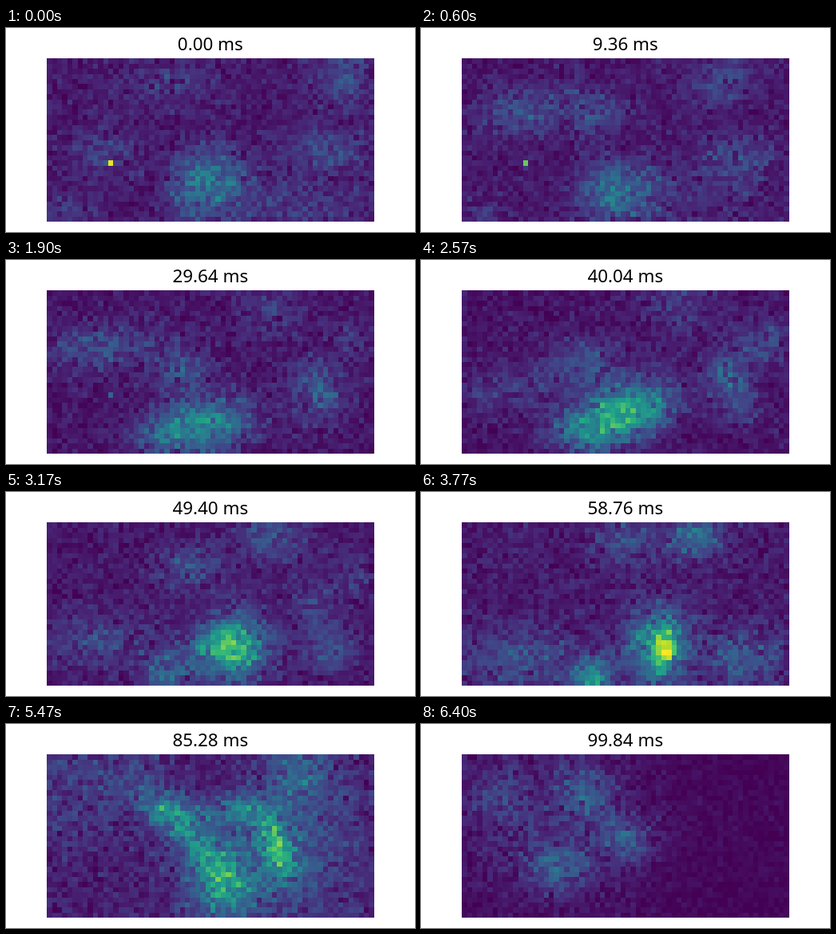
An HTML page with a canvas that plays this animation: 512 by 256 pixels, repeating every 6430 ms.

```html
<!DOCTYPE html>
<html lang="en">
<head>
<meta charset="utf-8">
<title>Intensity map</title>
<style>
  html, body { margin: 0; width: 100%; height: 100%; overflow: hidden; background: #fff; }
  canvas, svg { position: absolute; left: 0; top: 0; display: block; }
  text { font: 22.4px "Noto Sans", "Open Sans", sans-serif; fill: #000; text-anchor: middle; }
</style>
</head>
<body>
<canvas id="map" width="512" height="256"></canvas>
<svg width="512" height="256"><text id="label" x="255.8" y="27.5">0.00 ms</text></svg>
<script>
const COLS = 64, ROWS = 32, CELL = 6.4, LEFT = 51.2, TOP = 38.4;
const LOOP = 6430, STEP_MS = 0.52, LAST = 192;
const ctx = document.getElementById('map').getContext('2d');
const label = document.getElementById('label');

// Viridis, sampled every tenth
const STOPS = ['440154', '482475', '414487', '355f8d', '2a788e', '21918c',
  '22a884', '44bf70', '7ad151', 'bddf26', 'fde725']
  .map(h => [0, 2, 4].map(i => parseInt(h.slice(i, i + 2), 16)));
const PALETTE = Array.from({ length: 256 }, (_, n) => {
  const p = n / 25.5, i = Math.min(9, Math.floor(p));
  return `rgb(${STOPS[i].map((c, k) => Math.round(c + (STOPS[i + 1][k] - c) * (p - i)))})`;
});

const clamp = (v, lo, hi) => Math.min(hi, Math.max(lo, v));
const mix = (a, b, u) => a + (b - a) * u;

function rand(a, b = 0) {
  let h = Math.imul(a + 1, 0x9e3779b1) ^ Math.imul(b + 7, 0x85ebca6b);
  h = Math.imul(h ^ (h >>> 15), 0x2c1b3c6d);
  h = Math.imul(h ^ (h >>> 12), 0x297a2d39);
  return ((h ^ (h >>> 15)) >>> 0) / 4294967296;
}

// Roughly normal, unit deviation
const noise = (a, b) =>
  (rand(a, b * 3) + rand(a, b * 3 + 1) + rand(a, b * 3 + 2) - 1.5) * 2;

// Centre and radii in cells, peak brightness, tilt in radians
const blob = (x, y, rx, ry, amp, tilt = 0) => ({ x, y, rx, ry, amp, tilt });
const scenes = [];
const scene = (step, base, blobs) => scenes.push({ step, base, blobs });

// A blob keeps its name from scene to scene and travels between its places
scene(0, 0.065, {
  core: blob(32, 23.5, 4.7, 4.4, 0.26), tail: blob(28, 26.5, 3, 3.5, 0.11),
  crest: blob(23, 5, 6, 3, 0.08), east: blob(55, 18, 6, 2.5, 0.15),
  southEast: blob(46, 28.5, 10, 4, 0.1), west: blob(11.5, 18, 5, 3, 0.11),
  north: blob(58, 4, 4, 4, 0.16), corner: blob(4, 30, 4, 2, 0.1) });
scene(37, 0.06, {
  core: blob(30, 28.5, 7, 3.5, 0.21), crest: blob(28.5, 16.5, 3, 3, 0.17),
  east: blob(53, 21.5, 4, 4, 0.15), west: blob(10, 3, 4, 3, 0.22),
  north: blob(43.5, 4.5, 5, 3, 0.1), northWest: blob(20, 8, 5, 4, 0.08) });
scene(77, 0.055, {
  core: blob(31, 24.3, 6.8, 3.6, 0.6, -0.35), tail: blob(22.5, 28, 4, 3, 0.13),
  crest: blob(24, 14, 5, 3, 0.18), east: blob(52.5, 16.5, 3, 4, 0.23),
  southEast: blob(55, 23, 2.5, 2.5, 0.11), west: blob(9, 19, 8, 3, 0.1),
  north: blob(43, 3, 5, 4, 0.1), edge: blob(60, 10.5, 3, 3, 0.15) });
scene(113, 0.07, {
  core: blob(39.6, 25, 1.6, 3, 0.46, 0.35), halo: blob(38.2, 24, 4.4, 5.4, 0.4),
  tail: blob(25.5, 30.5, 2.5, 2.5, 0.45), crest: blob(32, 3.5, 4, 3, 0.15),
  southEast: blob(55.5, 26.5, 5, 4, 0.19), west: blob(11.5, 26.5, 8, 4, 0.17),
  north: blob(45.5, 2.5, 4, 3, 0.25) });
scene(137, 0.115, {
  core: blob(36, 19.5, 4.7, 4.2, 1.9, 0.78), halo: blob(36, 19, 7, 7, 0.25),
  crest: blob(23.5, 6.5, 5, 3.5, 0.36, 0.4), east: blob(52, 20, 5, 4, 0.19),
  southEast: blob(46, 30, 5, 2, 0.15), west: blob(12, 23, 5, 4, 0.06),
  northWest: blob(14, 3.5, 6, 3, 0.27, 0.3) });
scene(164, 0.09, {
  core: blob(34.5, 25, 5, 5.5, 0.38), halo: blob(45, 18, 2.3, 4.8, 0.43, -0.35),
  tail: blob(23, 11, 3, 2, 0.13), crest: blob(27.5, 15.5, 8, 2.8, 0.31, 0.8),
  east: blob(50, 17, 8, 11, 0.14), north: blob(49, 4, 4, 4, 0.17),
  northWest: blob(9, 5, 9, 6, 0.1), ridge: blob(37, 11, 5, 2, 0.27) });
scene(LAST, 0.015, {
  core: blob(32, 16.5, 3.5, 3.5, 0.21), tail: blob(19, 22, 4.2, 3.2, 0.23),
  crest: blob(24, 8, 4, 4, 0.2), west: blob(15, 13, 14, 14, 0.08),
  northWest: blob(7, 8, 4, 4, 0.1) });

// A blob missing from one of two scenes fades where it stands
function between(a, b, u) {
  const from = a || { ...b, amp: 0 }, to = b || { ...a, amp: 0 };
  const o = {};
  for (const key in from) o[key] = mix(from[key], to[key], u);
  o.cos = Math.cos(o.tilt);
  o.sin = Math.sin(o.tilt);
  return o;
}

function fieldAt(step) {
  let k = 0;
  while (k < scenes.length - 2 && step >= scenes[k + 1].step) k++;
  const a = scenes[k], b = scenes[k + 1];
  const u = (step - a.step) / (b.step - a.step);
  const names = Object.keys({ ...a.blobs, ...b.blobs });
  return {
    base: mix(a.base, b.base, u),
    blobs: names.map(name => between(a.blobs[name], b.blobs[name], u))
  };
}

function brightness({ base, blobs }, x, y) {
  let sum = base;
  for (const o of blobs) {
    const dx = x - o.x, dy = y - o.y;
    const p = (dx * o.cos + dy * o.sin) / o.rx;
    const q = (dy * o.cos - dx * o.sin) / o.ry;
    sum += o.amp * Math.exp(-(p * p + q * q) / 2);
  }
  return sum;
}

const edge = (start, i) => Math.round(start + i * CELL);

function draw(step) {
  const field = fieldAt(step);
  const hot = 0.97 - step * 0.0115;
  for (let r = 0; r < ROWS; r++) {
    for (let c = 0; c < COLS; c++) {
      const mean = brightness(field, c + 0.5, r + 0.5);
      let v = mean + 0.14 * Math.sqrt(mean) * noise(step, r * COLS + c);
      if (c === 12 && r === 20) v = Math.max(v, hot);
      const x = edge(LEFT, c), y = edge(TOP, r);
      ctx.fillStyle = PALETTE[Math.round(clamp(v, 0, 1) * 255)];
      ctx.fillRect(x, y, edge(LEFT, c + 1) - x, edge(TOP, r + 1) - y);
    }
  }
  label.textContent = (step * STEP_MS).toFixed(2) + ' ms';
}

// Thirty steps a second, each starting on a whole hundredth
const stepAt = ms =>
  Math.min(LAST, Math.floor((Math.floor(ms / 10) * 10 + 5) * 0.03));

const start = performance.now();
let shown = -1;
function tick() {
  const step = stepAt((performance.now() - start) % LOOP);
  if (step !== shown) draw(shown = step);
  requestAnimationFrame(tick);
}
tick();
</script>
</body>
</html>
```
